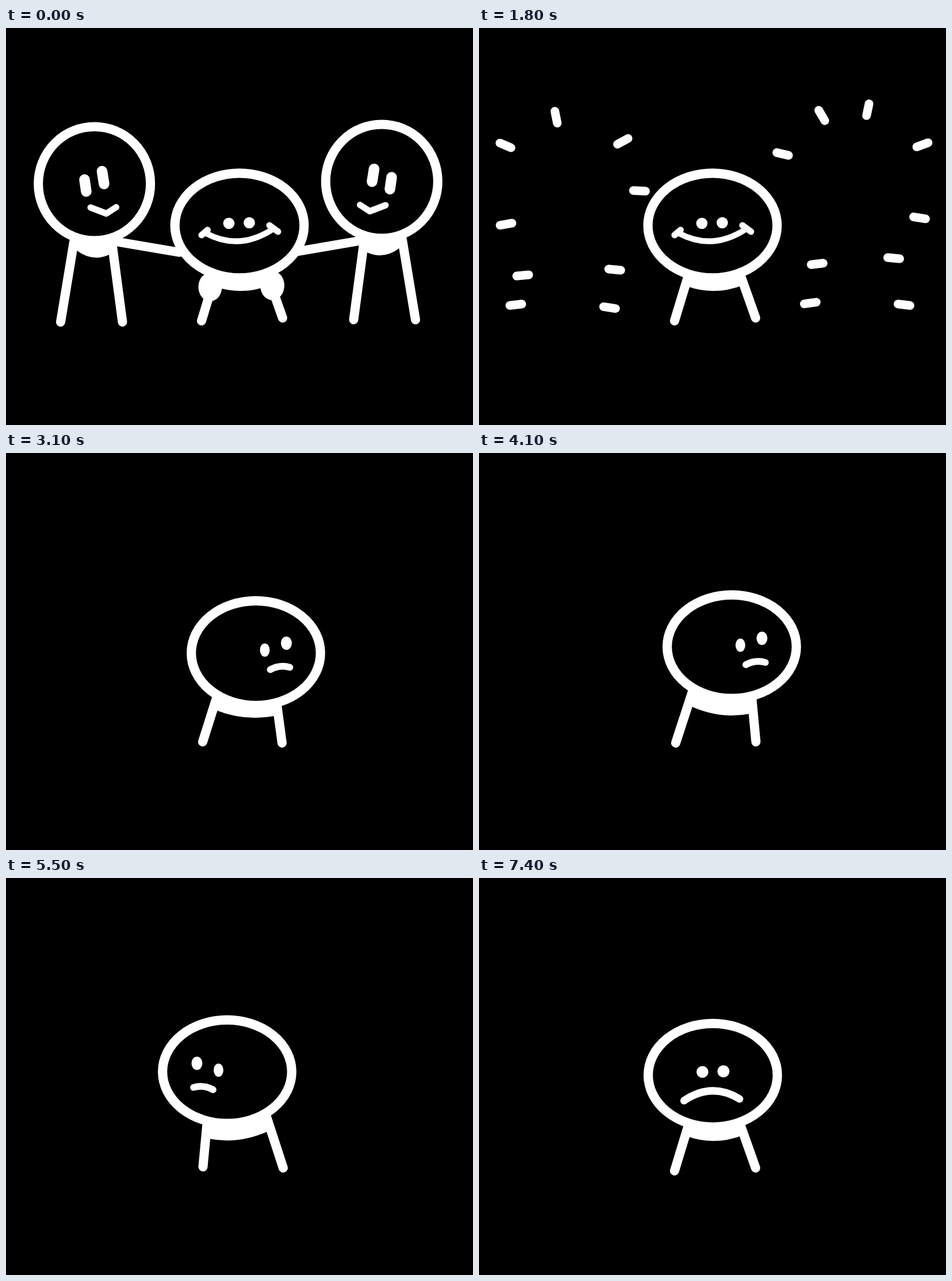
These frames come from a looping animation (812x690 px, 7700 ms). An HTML page with a canvas:

```html
<!DOCTYPE html>
<html lang="en">
<head>
<meta charset="utf-8">
<title>Left alone</title>
<style>
  html, body { margin: 0; width: 100%; height: 100%; overflow: hidden; background: #000; }
  canvas { display: block; }
</style>
</head>
<body>
<canvas id="stage" width="812" height="690"></canvas>
<script>
const ctx = document.getElementById('stage').getContext('2d');
const LOOP = 7700;
ctx.lineCap = ctx.lineJoin = 'round';
ctx.strokeStyle = '#fff';

function line(width, ...xy) {
  ctx.beginPath();
  for (let i = 0; i < xy.length; i += 2) ctx.lineTo(xy[i], xy[i + 1]);
  ctx.lineWidth = width;
  ctx.stroke();
}
// A bow from end to end whose middle reaches the given height.
function bow(width, x0, y0, x1, y1, midY) {
  ctx.beginPath();
  ctx.moveTo(x0, y0);
  ctx.quadraticCurveTo((x0 + x1) / 2, 2 * midY - (y0 + y1) / 2, x1, y1);
  ctx.lineWidth = width;
  ctx.stroke();
}
function oval(x, y, rx, ry = rx) {
  ctx.beginPath();
  ctx.ellipse(x, y, rx, ry, 0, 0, 2 * Math.PI);
  ctx.fillStyle = '#fff';
  ctx.fill();
}
function ring(x, y, rx, ry, width) {
  ctx.beginPath();
  ctx.ellipse(x, y, rx, ry, 0, 0, 2 * Math.PI);
  ctx.fillStyle = '#000';
  ctx.fill();
  ctx.lineWidth = width;
  ctx.stroke();
}
// The underside of a body, sagging between the two legs.
function belly(x0, y0, x1, y1, midY) {
  ctx.beginPath();
  ctx.moveTo(x0, y0 - 28);
  ctx.lineTo(x0, y0);
  ctx.quadraticCurveTo((x0 + x1) / 2, 2 * midY - (y0 + y1) / 2, x1, y1);
  ctx.lineTo(x1, y1 - 28);
  ctx.fillStyle = '#fff';
  ctx.fill();
}
function mirrored(axisSum, dy, draw) {
  ctx.save();
  ctx.translate(axisSum, dy);
  ctx.scale(-1, 1);
  draw();
  ctx.restore();
}

// Two drawings of each pose, v = 0 and v = 1, alternate to make the line wobble.
function parent(v) {
  line(16, 118, 372, 95 - v, 511);
  line(16, 184, 372, 202.5, 511);
  belly(122, 386, 183, 392, 399 - v);
  ring(153.7, 270.5 - v / 2, 97.5, 99 + v / 2, 16 + v / 2);
  line(18.5, 136.5, 263.5, 139.5, 284);
  line(18.5, 167, 249, 170.5, 271);
  line(11, 147 - v, 312, 174.5, 322.5 - v / 2, 191.5, 311.5);
}
function childHead(x, y, v) {
  ring(x + v / 2, y - v / 2, 112.3, 91 - v, 16.2);
}
function frontBody() {
  line(16, 364, 430, 340, 509);
  line(16, 454, 428, 481, 504);
  belly(362, 449, 459, 447, 457);
}
function tiltedBody() {
  line(16, 372, 412, 342, 504);
  line(16, 474, 422, 481.5, 502);
  belly(368, 440, 472, 453, 455);
}
function turningBody() {
  line(16, 367, 423, 342, 502);
  line(16, 470, 430, 480, 504);
  belly(365, 447, 467, 457, 459.5);
}

function smile(v) {
  oval(387.5 - v / 2, 339.5, 9.8);
  oval(423 + v / 2, 338.5, 9.8);
  bow(10, 347, 356.5, 464, 349.5, 370.5 - v);
  line(11, 340, 360, 350.5, 351);
  line(11, 458, 343, 473, 354);
}
function frown(v) {
  oval(388.5, 338 - v, 10.3);
  oval(425, 337 - v, 10.5);
  bow(13, 356.5, 388 - v, 453, 384, 371 - v);
}
// A blank face; turn runs from 0, straight ahead, to 1, fully aside.
function blank(x, y, turn) {
  oval(x - 18 + 33.5 * turn, y - 5, 8.5, 11.5);
  oval(x + 17 + 36 * turn, y - 6 - 11 * turn, 9.5, 11.5);
  const mouth = x + 42 * turn, tilt = 2 * turn;
  bow(11.7, mouth - 17, y + 27 + tilt, mouth + 17, y + 27 - tilt, y + 23.5);
}

function child(v, face) {
  frontBody();
  childHead(406, 343.3, v);
  face(v);
}
const sad = v => child(v, frown);

function family(v) {
  line(15.5, 190, 371, 302, 390);
  line(15.5, 617, 369.5, 506, 388.5);
  parent(v);
  mirrored(807, -4, () => parent(v));
  oval(355, 450, 20.5, 25);
  oval(463, 447.5, 21, 25.5);
  child(v, smile);
}

// Dashes fly off from where a parent stood, ever flatter towards the ground.
function burst(cx, cy, spots) {
  for (const [x, y] of spots) {
    const dx = x - cx, dy = y - cy;
    const angle = Math.atan2(dy * Math.max(0.05, 0.5 - dy / 300), dx);
    const ex = 10.5 * Math.cos(angle), ey = 10.5 * Math.sin(angle);
    line(15, x - ex, y - ey, x + ex, y + ey);
  }
}
function pop() {
  child(0, smile);
  burst(154, 268, [[134, 155], [46, 204], [250, 197], [279, 283], [47, 341],
    [76, 430], [64, 481], [236, 420], [227, 486]]);
  burst(653, 264, [[528, 219], [596, 152], [676, 142], [771, 203], [766, 330],
    [721, 400], [588, 410], [576, 478], [739, 481]]);
}

function look(v) {
  tiltedBody();
  childHead(439, 337.2, v);
  blank(439, 339, 1);
}
function turn() {
  turningBody();
  childHead(434.5, 347.8, 0);
  blank(434.5, 347.5, 1);
}
function halfTurn(x) {
  frontBody();
  childHead(x, 346, 0);
  blank(x, 346, 0.5);
}
const flipped = (pose, arg) => mirrored(824, 0, () => pose(arg));

const timeline = [];
function wobble(pose, start, first, count) {
  for (let i = 0; i < count; i++) {
    timeline.push([start + (i && first + 300 * (i - 1)), () => pose(i % 2)]);
  }
}
wobble(family, 0, 300, 6);
timeline.push([1800, pop]);
wobble(sad, 1900, 200, 4);
timeline.push([3000, () => halfTurn(420)], [3100, turn]);
wobble(look, 3200, 300, 4);
timeline.push([4400, () => halfTurn(420)], [4500, () => flipped(turn)]);
wobble(v => flipped(look, v), 4600, 300, 4);
timeline.push([5800, () => flipped(turn)], [5900, () => flipped(halfTurn, 426)]);
wobble(sad, 6000, 200, 6);

const start = performance.now();
function render() {
  const t = (performance.now() - start) % LOOP;
  const [, draw] = timeline.findLast(([from]) => from <= t);
  ctx.fillStyle = '#000';
  ctx.fillRect(0, 0, 812, 690);
  draw();
  requestAnimationFrame(render);
}
render();
</script>
</body>
</html>
```
